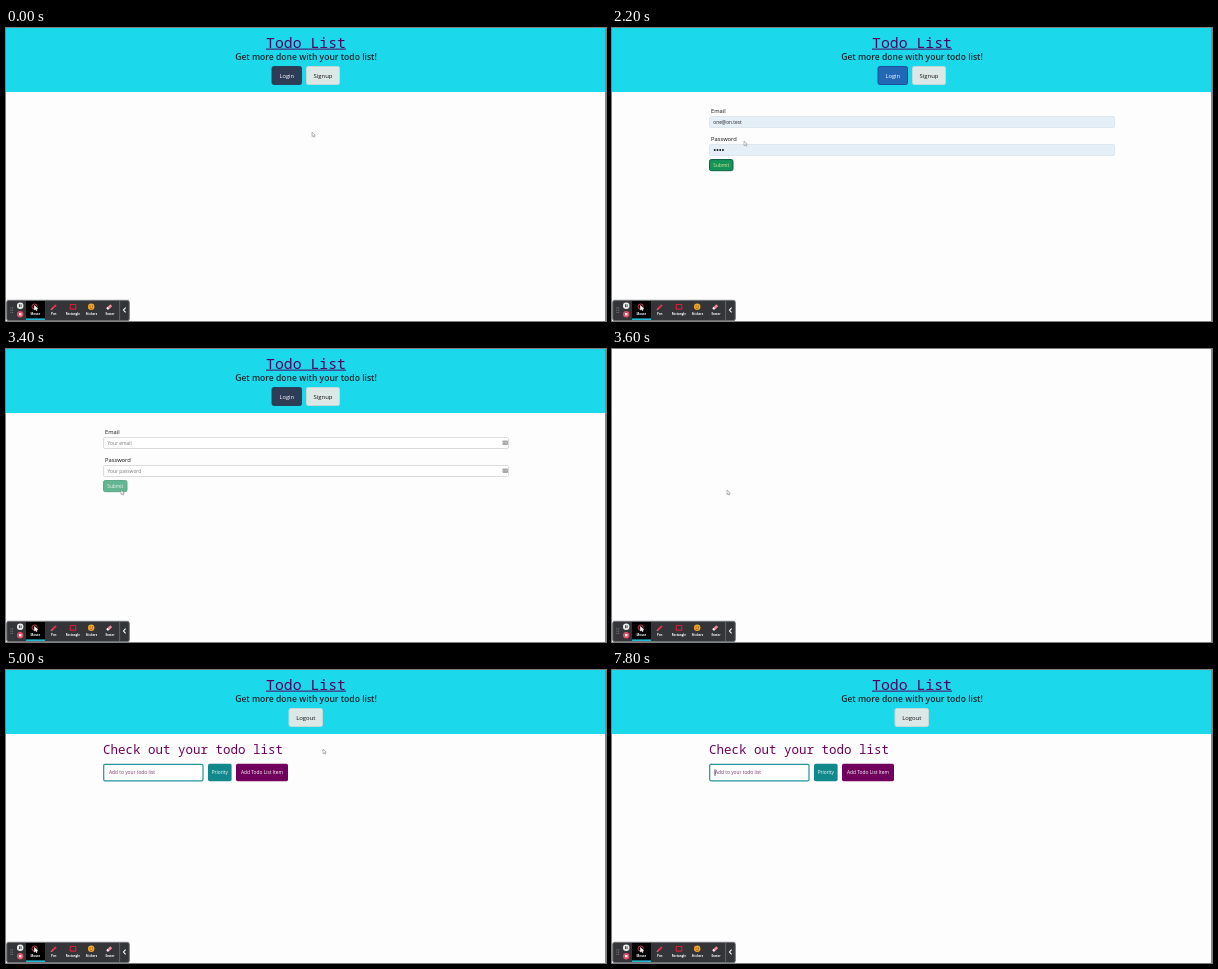
Animation, 600 px wide and 293 px high, one loop 8000 ms. Source, as an HTML page with a canvas:

```html
<!DOCTYPE html>
<html lang="en">
<head>
<meta charset="utf-8">
<title>Todo List</title>
<style>
  html, body { margin: 0; width: 100%; height: 100%; overflow: hidden; background: #fdfdfd; }
  canvas { display: block; width: 600px; height: 293px; }
</style>
</head>
<body>
<canvas id="stage"></canvas>
<script>
const LOOP = 8000, STEP = 200, W = 600, H = 293;
const SANS = '"Open Sans", "Noto Sans", sans-serif';
const MONO = '"Noto Sans Mono", "DejaVu Sans Mono", monospace';
const PURPLE = '#70005c', TEAL = '#10888c', CYAN = '#1bd9eb';

const canvas = document.getElementById('stage');
const ctx = canvas.getContext('2d');
const ratio = window.devicePixelRatio || 1;
canvas.width = W * ratio;
canvas.height = H * ratio;

// Pointer path: time, x, y of the tip
const path = [
  [0, 306, 104], [200, 291, 70], [400, 281, 47], [1200, 281, 47],
  [1400, 262, 54], [1800, 188, 84], [2200, 132, 113], [2400, 115, 141],
  [4000, 115, 141], [4200, 122, 124], [4400, 130, 108], [4800, 130, 108],
  [5000, 317, 79], [5800, 317, 79], [6000, 250, 90], [6200, 133, 101], [8000, 133, 101]
];
const clicks = [[400, 281, 48], [2800, 116, 142], [6400, 133, 101]];

function pointerAt(t) {
  const i = Math.max(1, path.findIndex(p => p[0] >= t));
  const [t0, x0, y0] = path[i - 1], [t1, x1, y1] = path[i];
  const k = (t - t0) / (t1 - t0);
  return [x0 + (x1 - x0) * k, y0 + (y1 - y0) * k];
}

function rect(x, y, w, h, color) {
  ctx.fillStyle = color;
  ctx.fillRect(x, y, w, h);
}

function box(x, y, w, h, r, fill, stroke, width = 1) {
  ctx.beginPath();
  ctx.roundRect(x, y, w, h, r);
  if (fill) { ctx.fillStyle = fill; ctx.fill(); }
  if (stroke) { ctx.strokeStyle = stroke; ctx.lineWidth = width; ctx.stroke(); }
}

function disc(x, y, r, color) {
  ctx.beginPath();
  ctx.arc(x, y, r, 0, Math.PI * 2);
  ctx.fillStyle = color;
  ctx.fill();
}

function line(points, color, width = 1) {
  ctx.beginPath();
  points.forEach(([x, y]) => ctx.lineTo(x, y));
  ctx.strokeStyle = color;
  ctx.lineWidth = width;
  ctx.stroke();
}

function text(str, x, y, size, color, { align = 'left', weight = 400, family = SANS } = {}) {
  ctx.font = `${weight} ${size}px ${family}`;
  ctx.textAlign = align;
  ctx.fillStyle = color;
  ctx.fillText(str, x, y);
}

function button(label, x, y, w, h, fill, color, size, weight = 400, border) {
  box(x, y, w, h, 1.8, fill, border);
  text(label, x + w / 2, y + h / 2 + size * 0.35, size, color, { align: 'center', weight });
}

function header(loggedIn, loginFocused) {
  rect(0, 0, W, 64, CYAN);
  text('Todo List', 300, 19.6, 14.8, '#520060', { align: 'center', family: MONO });
  rect(260, 20.6, 80, 1, '#520060');
  text('Get more done with your todo list!', 300, 32.4, 8.57, '#17262c', { align: 'center', weight: 600 });
  if (loggedIn) {
    button('Logout', 283, 38.5, 33.5, 18, '#dce8e6', '#111', 5.95, 400, '#c3d8d8');
    return;
  }
  const login = loginFocused ? ['#2268b5', '#1d509a'] : ['#2f3c55', '#27425b'];
  button('Login', 266, 38.5, 29.5, 18, login[0], '#fff', 5.8, 400, login[1]);
  button('Signup', 300.5, 38.5, 33, 18, '#dce8e6', '#111', 5.95, 400, '#c3d8d8');
}

function field(label, y, filled, placeholder) {
  text(label, 99, y - 3.4, 5.75, '#111');
  box(97.5, y + 0.5, 405, 11, 1.2, filled ? '#e5eff7' : '#fff', filled ? '#dfe7ee' : '#dcdcdc');
  if (filled) return;
  text(placeholder, 101.5, y + 7.7, 4.9, '#777');
  box(496.5, y + 3.5, 5.5, 4.5, 0.8, '#a9a9a9');
  for (let i = 0; i < 3; i++) disc(497.8 + i * 1.45, y + 5.8, 0.4, '#fff');
}

function loginForm(filled, hovered) {
  field('Email', 88, filled, 'Your email');
  field('Password', 116, filled, 'Your password');
  if (filled) {
    text('one@on.test', 101.3, 95.6, 4.8, '#222');
    for (let i = 0; i < 4; i++) disc(102.7 + i * 2.75, 122, 0.95, '#111');
  }
  const [fill, color, border] = hovered
    ? ['#64b592', '#eefaf3', '#5cab89']
    : ['#159257', '#d9ee98', '#12614a'];
  button('Submit', 97.5, 131.5, 23.5, 11.2, fill, color, 4.85, 400, border);
}

function todoPage(caret) {
  text('Check out your todo list', 97, 83.5, 12.5, PURPLE, { family: MONO });
  box(97.7, 94.3, 99.3, 16.5, 1.2, '#fff', '#239399', 1.2);
  text('Add to your todo list', 103, 104.4, 4.85, '#79336d');
  if (caret) rect(102.6, 99.4, 0.8, 6.4, '#222');
  button('Priority', 202, 93.8, 23.6, 17.5, TEAL, '#fff', 4.75, 500);
  button('Add Todo List Item', 230, 93.8, 52, 17.5, PURPLE, '#fff', 4.85, 500);
}

function toolbar() {
  box(0.7, 272.3, 122.6, 20.4, 2, '#333538', '#727578', 1);
  for (let i = 0; i < 3; i++)
    for (const x of [4.5, 6.3]) rect(x, 279.5 + i * 2.2, 0.8, 0.8, '#aaa');

  disc(14.2, 277.7, 3.2, '#eee');
  rect(13, 276.3, 0.9, 2.8, '#333');
  rect(14.6, 276.3, 0.9, 2.8, '#333');
  disc(14.2, 286.2, 3.2, '#e44a60');
  rect(13, 285, 2.4, 2.4, '#fff');

  rect(20, 273, 19, 18, '#000');
  rect(20, 290.4, 19, 1.6, '#22b8d6');
  ctx.beginPath();
  ctx.arc(28.6, 278.6, 2.6, 0, Math.PI * 2);
  ctx.strokeStyle = '#e0445a';
  ctx.lineWidth = 0.9;
  ctx.stroke();
  arrow(28.4, 277.4, '#fff', '#fff');

  line([[45.8, 281], [50, 277]], '#e0304c', 2);
  line([[45, 281.8], [46.2, 280.6]], '#f3b5bd', 1);
  box(64.3, 276.5, 5.4, 4.6, 0, null, '#d51e3a', 1.1);
  disc(85.2, 278.8, 3.2, '#f5a728');
  disc(84.1, 278.1, 0.5, '#553311');
  disc(86.3, 278.1, 0.5, '#553311');
  line([[83.7, 279.8], [85.2, 280.7], [86.7, 279.8]], '#8a2a20', 0.6);
  line([[101.4, 280.7], [105.3, 277.2]], '#f08a9c', 2.6);
  line([[101, 281], [102.3, 279.9]], '#fff', 2.2);

  [['Mouse', 29.4], ['Pen', 47.8], ['Rectangle', 66.8], ['Stickers', 85.4], ['Eraser', 104]]
    .forEach(([name, x]) => text(name, x, 287, 2.9, '#fff', { align: 'center', weight: 700 }));
  rect(113.4, 273, 0.7, 19, '#777');
  line([[119.6, 279.7], [117.5, 282], [119.6, 284.3]], '#fff', 1.1);
}

function arrow(x, y, fill, stroke) {
  ctx.beginPath();
  [[0, 0], [0, 4.6], [1.1, 3.7], [1.9, 5.2], [2.7, 4.8], [2, 3.3], [3.3, 3.2]]
    .forEach(([dx, dy]) => ctx.lineTo(x + dx, y + dy));
  ctx.closePath();
  ctx.fillStyle = fill;
  ctx.fill();
  ctx.strokeStyle = stroke;
  ctx.lineWidth = 0.55;
  ctx.stroke();
}

function pointer(t) {
  if (t >= 6200) return;
  const [x, y] = pointerAt(t);
  if (t >= 4400 && t < 5000) line([[x, y - 2.5], [x, y + 3]], '#777', 0.6);
  else arrow(x, y, '#fafafa', '#858585');
}

function clickRing(t) {
  for (const [start, x, y] of clicks) {
    const age = t - start;
    if (age < 0 || age >= 600) continue;
    ctx.globalAlpha = age < 400 ? 0.9 : 0.35;
    ctx.beginPath();
    ctx.arc(x, y, 6.5 + age * 0.0175, 0, Math.PI * 2);
    ctx.strokeStyle = '#d84052';
    ctx.lineWidth = 1.4;
    ctx.stroke();
    ctx.globalAlpha = 1;
  }
}

function draw(t) {
  ctx.setTransform(ratio, 0, 0, ratio, 0, 0);
  rect(0, 0, W, H, '#fdfdfd');
  if (t < 3600) {
    header(false, t >= 400 && t < 2800);
    if (t >= 400) loginForm(t < 3000, t >= 2400);
  } else if (t >= 3800) {
    header(true);
    todoPage(t >= 6400 && (t < 7200 || t >= 7800));
  }
  rect(599, 0, 1, H, '#85898b');
  toolbar();
  pointer(t);
  clickRing(t);
}

const origin = performance.now();
function tick() {
  const t = (performance.now() - origin) % LOOP;
  draw(Math.floor(t / STEP) * STEP);
  requestAnimationFrame(tick);
}
tick();
</script>
</body>
</html>
```
